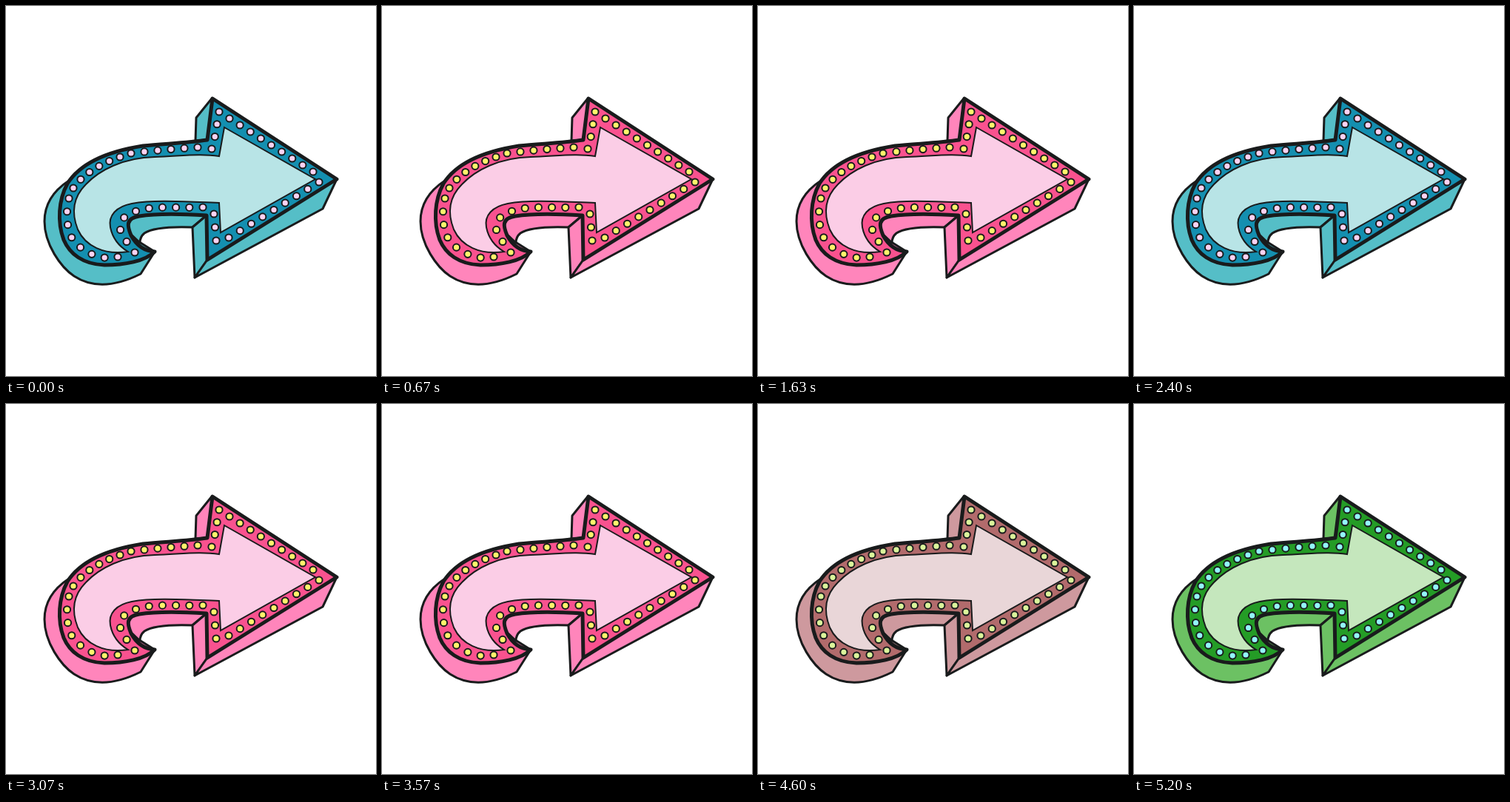
Write an HTML page that moves like this. It is 500 px wide and 500 px high and loops after 5.26 s.

```html
<!DOCTYPE html>
<html>
<head>
<meta charset="utf-8">
<style>
  html, body { margin: 0; width: 100%; height: 100%; overflow: hidden; background: #fff; }
  svg { display: block; width: 100vw; height: 100vh; }
  path, circle { stroke: #191b1c; stroke-linejoin: round; }
  .side { fill: var(--side); stroke-width: 3; }
  .face { fill: var(--face); stroke-width: 5; }
  .panel { fill: var(--panel); stroke-width: 2; stroke-linejoin: miter; }
  circle { fill: var(--bulb); stroke-width: 2; }
</style>
</head>
<body>
<svg viewBox="0 0 500 500">
  <!-- extruded sides -->
  <path class="side" d="M85 236 C62 251 52 270 52 291 C52 322 74 353 92 365 C118 382 150 378 182 362 L201 332 L150 300Z"/>
  <path class="side" d="M278 125 L257 151 L256 182 L275 184Z"/>
  <path class="side" d="M271 283 L252 299 C224 298 199 299 187 307 Q181 312 181 320 L160 300 L170 278Z"/>
  <path class="side" d="M271 283 L252 299 L255 367 L272 343Z"/>
  <path class="side" d="M447 234 L428 274 L255 367 L272 343Z"/>
  <!-- front -->
  <path class="face" d="M279 125 L447 234 L272 343 L271 283 C240 281 205 280 180 284 C161 287 164 298 169 310 C176 323 186 331 201 332 C188 345 160 350 133 350 C104 349 86 335 78 316 C69 292 71 262 83 240 C100 213 134 197 185 189 C215 186 245 185 272 181Z"/>
  <path class="panel" d="M295 164 L418 234 L290 306 L288 266 C250 265 203 261 170 267 C149 271 138 283 141 299 C144 314 153 325 165 332 C132 337 107 324 97 302 C88 279 91 258 108 241 C126 222 158 205 201 204 C235 203 262 199 288 203Z"/>
  <g id="bulbs"></g>
</svg>
<script>
const LOOP = 5260, FPS = 30, CYCLE = 14.4, STEP = 1.35; // CYCLE and STEP in ticks

const palettes = [
  { side: [85, 190, 199], face: [20, 143, 176], panel: [184, 228, 230], bulb: [251, 211, 243] },
  { side: [255, 133, 187], face: [249, 82, 143], panel: [251, 205, 230], bulb: [255, 243, 107] },
  { side: [108, 193, 99], face: [36, 156, 38], panel: [197, 231, 189], bulb: [147, 246, 250] }
];

// Evenly spaced bulbs along a path
function addBulbs(d, count) {
  const path = document.createElementNS('http://www.w3.org/2000/svg', 'path');
  path.setAttribute('d', d);
  const gap = path.getTotalLength() / (count - 1);
  for (let i = 0; i < count; i++) {
    const { x, y } = path.getPointAtLength(i * gap);
    bulbs.innerHTML += `<circle cx="${x}" cy="${y}" r="4.6"/>`;
  }
}

const bulbs = document.getElementById('bulbs');
addBulbs('M278 193 L282 178 L288 143', 4);
addBulbs('M302 152 L415 224', 9);
addBulbs('M423 238 L301 313', 9);
addBulbs('M284 317 L281 281', 3);
addBulbs('M266 272 C240 273 215 271 195 273 C165 277 150 288 155 304 Q162 319 174 333', 10);
addBulbs('M151 339 C127 345 101 331 90 315 C81 300 81 275 85 260', 8);
addBulbs('M91 246 C104 227 128 213 154 204', 6);
addBulbs('M169 199 Q210 194 259 191', 6);

const ramp = (step, from, length) => Math.max(0, Math.min(1, (step - from) / length));

function draw(ms) {
  const tick = Math.floor(ms % LOOP * FPS / 1000 + .1);
  const step = Math.floor((tick + .01) % CYCLE / STEP);
  // Blue to pink, a short rest, pink to green, green back to blue
  const pos = ramp(step, 0, 4) + ramp(step, 5, 3) + ramp(step, 8, 8 / 3);
  const index = Math.floor(pos), mix = pos - index;
  const from = palettes[index], to = palettes[(index + 1) % palettes.length];
  for (const part in from) {
    const rgb = from[part].map((v, c) => Math.round(v + (to[part][c] - v) * mix));
    document.documentElement.style.setProperty('--' + part, `rgb(${rgb})`);
  }
}

const start = performance.now();
function loop() {
  draw(performance.now() - start);
  requestAnimationFrame(loop);
}
loop();
</script>
</body>
</html>
```
